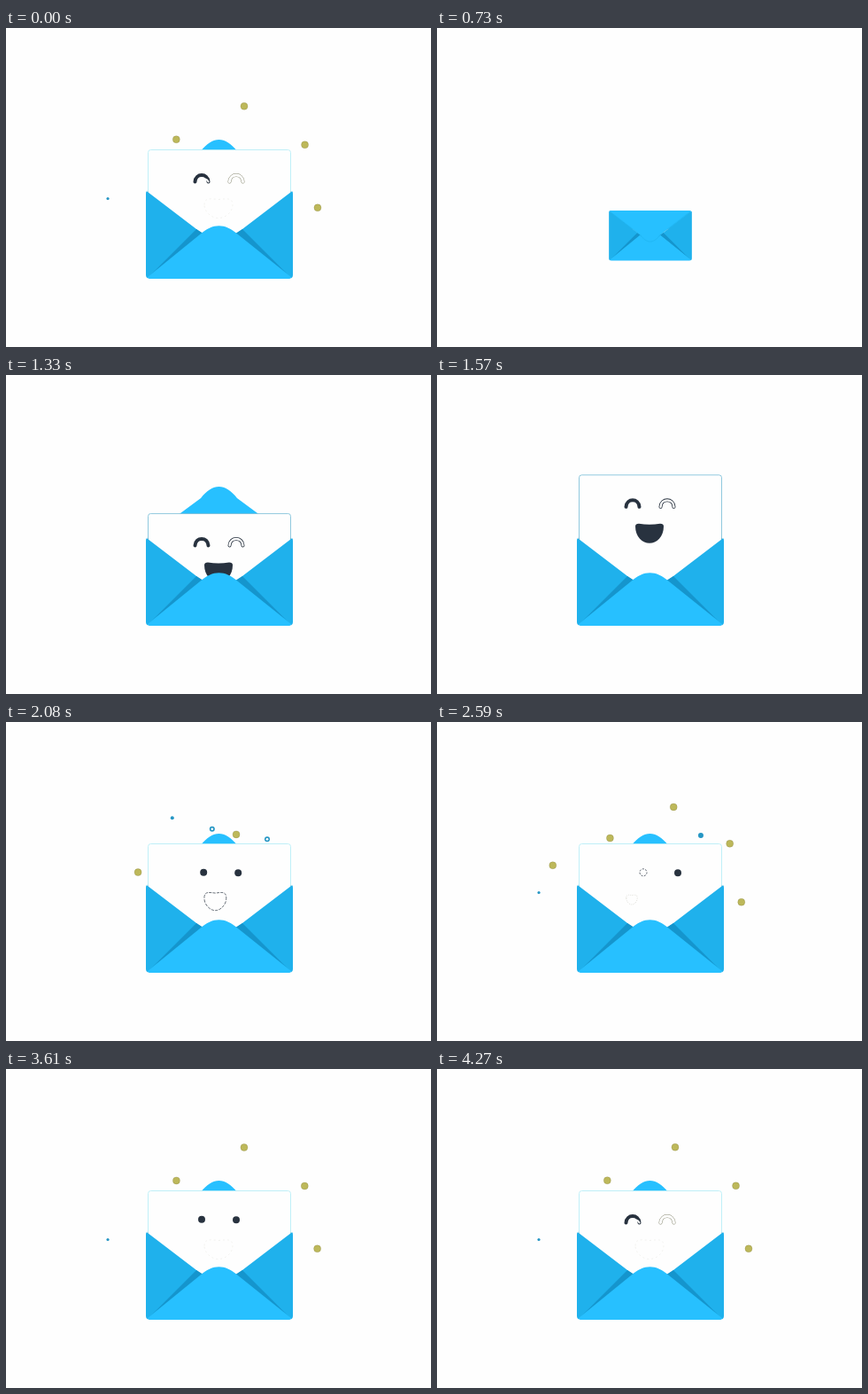
These frames come from a looping animation (480x360 px, 5.02 s). An HTML page with a canvas:

```html
<!DOCTYPE html>
<html lang="en">
<head>
<meta charset="utf-8">
<title>Happy letter</title>
<style>
html, body { margin: 0; width: 100%; height: 100%; overflow: hidden; background: #fefefe; }
canvas { display: block; }
</style>
</head>
<body>
<canvas id="stage" width="480" height="360"></canvas>
<script>
const ctx = document.getElementById('stage').getContext('2d');
const LOOP = 5020, STEP = 30, END = 4270;
const PAPER = '#fefefe', INK = '#28323f', BLUE = '#27c0ff', SIDE = '#1fb1ec', SHADE = '#1595cd';
const OLIVE = '#bdb85a', TEAL = '#2596c4';
const ORIGIN = { x: 241, y: 209 };

// Confetti: resting place, radius, colour, launch time, slowing time, vanishing time, ring
const confetti = [
  [269, 88.2, 4, OLIVE, 1719, 317],
  [192.3, 125.7, 4, OLIVE, 1719, 317],
  [337.6, 131.8, 4, OLIVE, 1719, 330],
  [352, 202.8, 4, OLIVE, 1719, 335],
  [129, 161, 4, OLIVE, 1719, 210, 3610],
  [115, 192.5, 1.6, TEAL, 2010, 70],
  [298, 128, 3, TEAL, 1719, 123, 3610, true],
  [185, 103, 4, TEAL, 1719, 120, 2400],
  [232, 112, 6, TEAL, 1719, 150, 2400, true]
];

const clamp = v => Math.max(0, Math.min(1, v));
const mix = (a, b, k) => a + (b - a) * k;
const smooth = (t, from, to) => {
  const u = clamp((t - from) / (to - from));
  return u * u * (3 - 2 * u);
};

function fill(path, color) {
  ctx.fillStyle = color;
  ctx.fill(new Path2D(path));
}

function stroke(path, color, width, dash = []) {
  ctx.strokeStyle = color;
  ctx.lineWidth = width;
  ctx.setLineDash(dash);
  ctx.stroke(new Path2D(path));
  ctx.setLineDash([]);
}

function dot(x, y, r, color) {
  ctx.beginPath();
  ctx.arc(x, y, r, 0, 7);
  ctx.fillStyle = color;
  ctx.fill();
}

function drawConfetti(t) {
  for (const [endX, endY, r, color, start, slow, end = Infinity, ring] of confetti) {
    if (t < start || t >= end) continue;
    const p = 1 - Math.exp((start - t) / slow);
    const x = mix(ORIGIN.x, endX, p), y = mix(ORIGIN.y, endY, p);
    const size = r * clamp((end - t) / 640);
    dot(x, y, size, color);
    if (color === OLIVE) {
      ctx.strokeStyle = 'rgba(110,108,50,.4)';
      ctx.lineWidth = .6;
      ctx.stroke();
    }
    if (ring && t < 2400) dot(x, y, size * .45, PAPER);
  }
}

function drawFlap(h) {
  const side = 183 + h * .774, tip = 183 + h * 1.075;
  const edge = `M159 184L220 ${side}C234 ${tip} 247 ${tip} 261 ${side}L322 184`;
  fill(edge + 'Q322 183 319 183H162Q159 183 159 184Z', BLUE);
  if (h > 40) stroke(edge, SIDE, 1);
}

function drawFront(t) {
  fill('M158 187Q158 183 160 185L221 231.5L160 282.5Q158 282 158 279Z', SIDE);
  fill('M324 187Q324 183 322 185L261 231.5L322 282.5Q324 282 324 279Z', SIDE);
  fill('M215 227L223 232L161 281Z M267 227L259 232L321 281Z', SHADE);
  fill('M160 281L219 233C234 220 247 220 262 233L322 281Q322 283 319 283H163Q160 283 160 281Z', BLUE);
  if (t < 1180) fill('M220 232C234 220 247 220 261 232Q241 251 220 232Z', SIDE);
}

function drawEye(x, y, open, hollow) {
  const path = `M${x - 4} ${y}a4 ${4 * open} 0 1 0 8 0a4 ${4 * open} 0 1 0 -8 0Z`;
  if (hollow) stroke(path, INK, .8, [2, 1.5]);
  else fill(path, INK);
}

function drawSmilingEyes(y, last) {
  const arc = x => `M${x - 7.5} ${y + 4}C${x - 7} ${y - 6} ${x + 7} ${y - 6} ${x + 7.5} ${y + 4}`;
  ctx.lineCap = 'round';
  stroke(arc(221), INK, 4);
  if (last) stroke(`M225 ${y + 1}Q228 ${y + 2} 228.5 ${y + 4}`, PAPER, 2);
  stroke(arc(260), last ? '#8d8e78' : INK, 4);
  stroke(arc(260), PAPER, last ? 3 : 2.4);
  ctx.lineCap = 'butt';
}

function drawMouth(x, y, sx, sy, t) {
  const chin = 'C16 4 8 11 0 11C-8 11-16 4-16-8Z';
  const laugh = 'M-16-8Q-16-11-12-11Q0-9 12-11Q16-11 16-8' + chin;
  const round = 'M-16-4C-16-12-10-11 0-10C10-11 16-12 16-4C16 4 8 11 0 11C-8 11-16 4-16-4Z';
  ctx.save();
  ctx.translate(x, y);
  ctx.scale(sx, sy);
  if (t < 1750) fill(laugh, INK);
  else if (t < 2300) stroke(round, INK, .8, [4, 1.5]);
  else stroke(round, t < 3370 ? 'rgba(100,100,70,.5)' : 'rgba(100,100,70,.08)', 1, [2, 3]);
  ctx.restore();
}

function drawFace(t, top) {
  const look = smooth(t, 1960, 2400) - smooth(t, 3360, 3610);
  const shape = Math.min(1, look * 2);
  const eyeY = top + 32.3;
  if (t < 1840 || t >= 4200) {
    drawSmilingEyes(top + 32, t >= 4200);
  } else {
    let open = clamp((t - 1810) / 120);
    if (t > 3000) open = Math.max(.15, clamp(Math.abs(t - 3220) / 80));
    if (t > 4100) open = Math.max(.2, 1 - (t - 4100) / 110);
    drawEye(221 + 12 * look, eyeY, open, t > 2300 && t < 3610);
    drawEye(260 + 12 * look, eyeY + .4, open);
  }
  drawMouth(240 - 20 * look, top + 66 - 3 * shape,
    mix(1, .39, shape), mix(1, .5, shape * shape), t);
}

function drawLetter(t) {
  const top = mix(219, 110, smooth(t, 1120, 1500)) + 27 * smooth(t, 1530, 1750);
  const sheet = `M160.5 250V${top + 3.5}q0-3 3-3H318.5q3 0 3 3V250Z`;
  fill(sheet, PAPER);
  stroke(sheet, t < 1750 ? '#74bcd6' : '#b0ecf6', .8);
  drawFace(t, top + .5);
}

function draw(t) {
  ctx.fillStyle = PAPER;
  ctx.fillRect(0, 0, 480, 360);
  if (t < 670) return;

  const size = 1 - (1 - clamp((t - 640) / 372)) ** 3;
  const flap = mix(62, -57, smooth(t, 1030, 1260));
  ctx.save();
  ctx.translate(241, 236);
  ctx.scale(size, size);
  ctx.translate(-241, -236);
  drawConfetti(t);
  fill('M160 184H322V280H160Z', flap < 55 ? INK : BLUE);
  if (flap <= 0) drawFlap(flap);
  ctx.save();
  ctx.beginPath();
  ctx.rect(150, 60, 180, 190);
  ctx.clip();
  drawLetter(t);
  ctx.restore();
  drawFront(t);
  if (flap > 0) drawFlap(flap);
  ctx.restore();
}

function tick() {
  const now = performance.now() % LOOP;
  const stepped = Math.floor((now - 10) / STEP) * STEP + 10;
  draw(now < 370 ? END : Math.min(stepped, END));
  requestAnimationFrame(tick);
}
tick();
</script>
</body>
</html>
```
